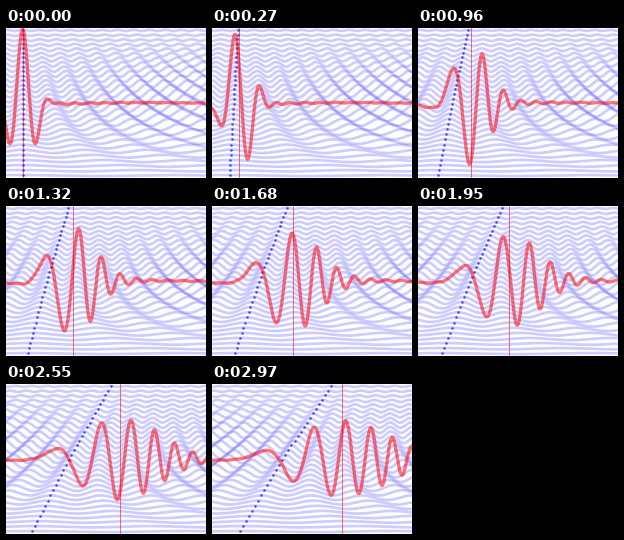
Recreate the animation shown at these times as a matplotlib script. Size 200 by 150 pixels, loop 3000 ms.

```python
import numpy as np
import matplotlib.pyplot as plt
from matplotlib.animation import FuncAnimation

W, H, DPI = 200, 150, 100
FRAMES, INTERVAL = 100, 30
WAVES = 31

START = W / 12           # where all crests meet at time zero
K0, K_SPAN = 0.219, 0.177  # central wavenumber and half range, rad/px
SIGMA = 0.0875           # spectral width
SPREAD = 261.6 / FRAMES  # dispersion per step: omega = SPREAD * k**2
PEAK = 73.5              # height of the packet at time zero


def px(size):
    """Pixels to points."""
    return size * 72 / DPI


k = K0 + K_SPAN * np.linspace(-1, 1, WAVES)
amp = np.exp(-((k - K0) / SIGMA) ** 2 / 2)
amp *= PEAK / amp.sum()
base = H - (np.arange(WAVES) + 0.5) * H / WAVES
x = np.linspace(-2, W + 2, 409)

fig = plt.figure(figsize=(W / DPI, H / DPI), dpi=DPI, facecolor="white")
ax = fig.add_axes([0, 0, 1, 1])
ax.set_xlim(0, W)
ax.set_ylim(H, 0)
ax.axis("off")

waves = [ax.plot([], [], color="blue", alpha=0.2, lw=px(2.7))[0] for _ in k]
crests, = ax.plot([], [], "o", color="blue", alpha=0.65, ms=px(2.6), mew=0)
packet, = ax.plot([], [], color="red", alpha=0.54, lw=px(3.3))
group = ax.axvline(START, color="red", alpha=0.55, lw=px(1))


def update(step):
    ct = SPREAD * step
    phase = np.outer(k, x - START) - (ct * k ** 2)[:, None]
    parts = amp[:, None] * np.cos(phase)
    for line, y0, part in zip(waves, base, parts):
        line.set_data(x, y0 - part)
    crests.set_data(START + ct * k, base - amp)
    packet.set_data(x, H / 2 - parts.sum(axis=0))
    group.set_xdata([START + 2 * K0 * ct] * 2)
    return [*waves, crests, packet, group]


anim = FuncAnimation(fig, update, frames=FRAMES, interval=INTERVAL,
                     repeat=True, repeat_delay=0)
plt.show()
```
